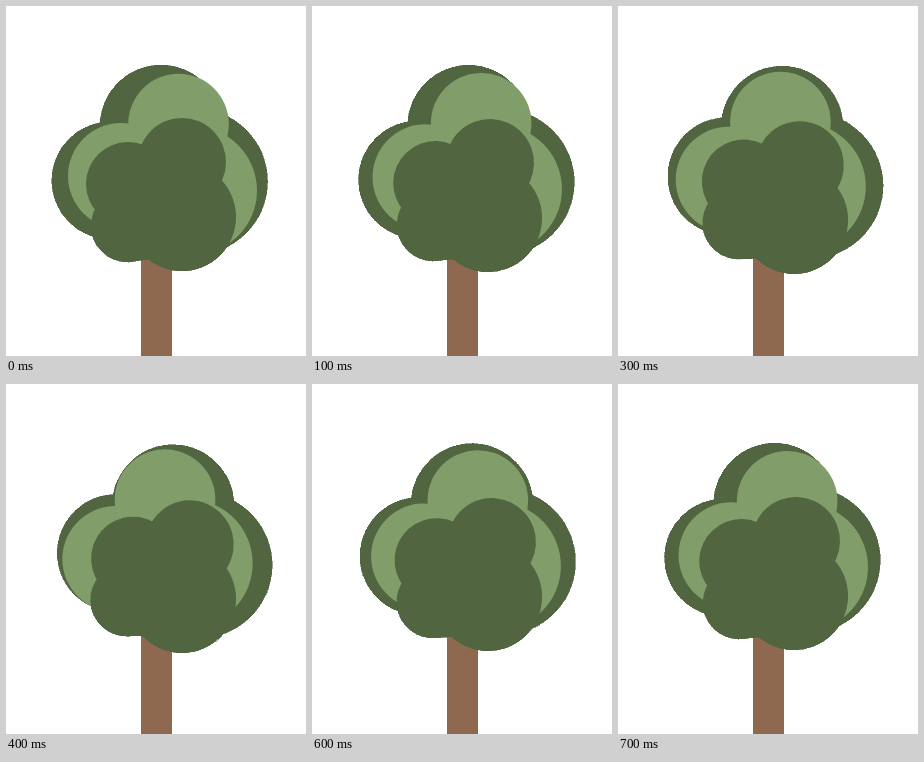
These frames come from a looping animation (300x350 px, 0.8 s). An HTML page:

```html
<!DOCTYPE html>
<html lang="en">
<head>
<meta charset="utf-8">
<title>Swaying tree</title>
<style>
  html, body { margin: 0; width: 100%; height: 100%; overflow: hidden; background: #fff; }
  svg { display: block; width: 100vw; height: 100vh; }
  .dark { fill: #506540; }
  .light { fill: #809d6a; }
  .crisp { shape-rendering: crispEdges; stroke: #506540; stroke-width: .6; }
</style>
</head>
<body>
<svg viewBox="0 0 300 350">
  <rect x="135" y="220" width="31" height="130" fill="#8e694f"/>
  <!-- hard outer edge below the smooth front leaves -->
  <use href="#front" class="crisp"/>
  <g id="back" class="dark crisp">
    <circle cx="155" cy="120" r="61"/>
    <circle cx="104.5" cy="174.5" r="58.7"/>
    <circle cx="188.7" cy="175.5" r="72.9"/>
  </g>
  <g id="middle" class="light">
    <circle cx="172.5" cy="118" r="50.3"/>
    <circle cx="115" cy="170" r="53"/>
    <circle cx="187" cy="184.5" r="64"/>
  </g>
  <g id="front" class="dark">
    <circle cx="176" cy="156" r="44"/>
    <circle cx="122" cy="178" r="42"/>
    <circle cx="121.5" cy="219.5" r="36.5"/>
    <circle cx="176" cy="211" r="54"/>
    <path d="M129 255L146 252.8V235H129Z"/>
  </g>
</svg>
<script>
  const LOOP = 800, STEP = 100;
  const PIVOT = "148.5 213";
  const BACK_ANGLES = [0, 1, 3.1, 5.6, 7.5];
  const layer = id => document.getElementById(id);
  const back = layer("back"), middle = layer("middle"), front = layer("front");

  function turn(el, angle) {
    el.setAttribute("transform", `rotate(${angle} ${PIVOT})`);
  }

  // The sway moves in held steps, out for half the loop and back again.
  function draw(time) {
    const step = Math.floor((time % LOOP) / STEP);
    const sway = 4 - Math.abs(4 - step);
    turn(back, BACK_ANGLES[sway]);
    turn(middle, -2 * sway);
    turn(front, 2 * sway);
  }

  let start;
  function tick(now) {
    start ??= now;
    draw(now - start);
    requestAnimationFrame(tick);
  }
  draw(0);
  requestAnimationFrame(tick);
</script>
</body>
</html>
```
